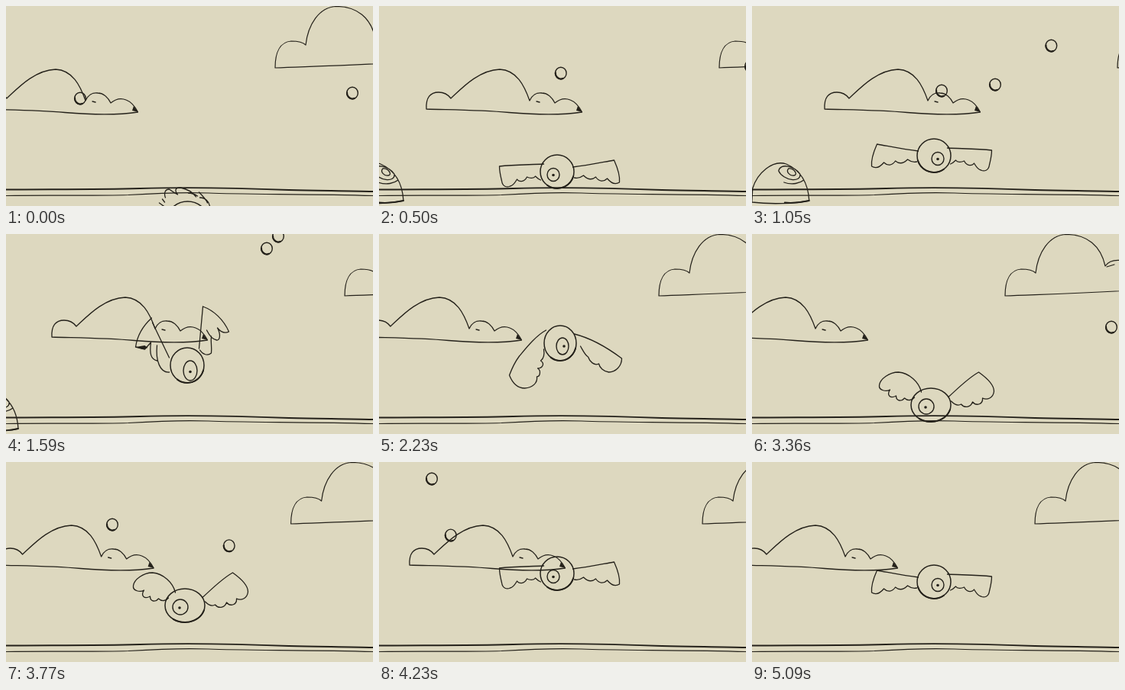
Animation, 480 px wide and 262 px high, one loop 5.13 s. Source, as an HTML page with a canvas:

```html
<!DOCTYPE html>
<html lang="en">
<head>
<meta charset="utf-8">
<title>Winged eye</title>
<style>
html, body { margin: 0; width: 100%; height: 100%; overflow: hidden; background: #ddd8bf; }
canvas { display: block; width: 480px; height: 262px; }
</style>
</head>
<body>
<canvas id="stage" width="480" height="262"></canvas>
<script>
const ctx = document.getElementById('stage').getContext('2d');
const LOOP = 5130, FPS = 22, LAST = 112;
const PAPER = '#ddd8bf', INK = '#24211a';

// [step, value] knots, joined by a smooth curve
const CLOUD_X = [[0, 352], [11, 445], [23, 478], [35, 443], [49, 366], [61, 314],
  [74, 331], [93, 423], [100, 438], [112, 370]];
const BIRD_Y = [[0, 280], [4, 240], [11, 217], [23, 196], [35, 172], [42, 148], [49, 143],
  [57, 222], [64, 236], [74, 224], [83, 188], [93, 146], [101, 226], [107, 176], [112, 157]];
const ROCK_X = [[7, -12], [11, 32], [22, 76], [35, 16], [39, -12]];

// [step, x, y, dx, dy, first step, last step]
const BALLS = [
  [0, 97, 121, 12.8, -3, 0, 31],
  [0, 453, 114, 9, 1, 0, 5],
  [11, 486, 79, -14, 2, 10, 29],
  [35, 341, 19, 9, -9, 24, 38],
  [35, 356, 3, 9, -9, 22, 37],
  [74, 470, 122, -19.8, -1.37, 73, 99],
  [93, 69, 22, -7, -6, 81, 98]
];

// wing pose for every two steps
const FLAPS = 'hhuudfufdfufdfufssdfufdddfufdfufdfufuufdfufddffuufddfuuff';

const path = d => new Path2D(d);

const LEFT_CLOUD = path('M62 135C61 120 67 113 78 113C86 113 91 117 94 121' +
  'C108 108 130 84 158 83C180 84 190 104 197 124C200 117 206 113 213 114' +
  'C221 114 227 121 230 127C236 122 243 120 250 123C258 126 262 132 265.5 139' +
  'C240 143 200 142 170 139.5C130 136 90 136 62 135M206 125L210 126');
const CLOUD_TIP = path('M260 131L266 139L258 137Z');
const RIGHT_CLOUD = path('M331 81C331 60 338 47 352 46C361 46 368 48 371 51' +
  'C374 25 388 1 412 .5C438 1 456 15 462 42C466 36 474 33 486 35' +
  'C500 38 508 52 510 72M331 81C380 79 430 78 510 73M464 43L474 40');
const GROUND_TOP = path('M0 240.5C60 240 120 240.5 175 239C240 237 320 239 370 241C410 242 450 242 480 243');
const GROUND_LOW = path('M0 248.5C60 247.5 110 249 160 247.5C200 245 230 243.5 265 245C310 247 400 246 480 248.5');
const ROCK = path('M0 16C-1 0 -7 -22 -30 -32C-48 -38 -68 -20 -74 0L-75 18C-50 21 -18 20 0 16' +
  'M-33 -8C-22 -4 -12 -7 -7 -11M-40 -23C-38 -34 -19 -29 -12 -19C-10 -7 -34 -10 -40 -23' +
  'M-27 -26C-20 -27 -14 -18 -20 -17C-25 -16 -31 -22 -27 -26');
const ROCK_SHADE = path('M-32 18.5C-20 19.5 -9 18 0 16');

// wings and ellipses sit around the centre; look is the side the pose is drawn for
const POSES = {
  f: {
    look: -1, body: [-2.5, 0, 22, 22], iris: [-7.5, 4, 8, 8.5], pupil: [-7.5, 4.5],
    wings: path('M-20 -10C-40 -9 -60 -9 -78 -7C-78 0 -76 8 -75 12C-74 20 -68 21 -64 19' +
      'C-59 18 -57 13 -55 10C-53 13 -46 15 -42 7C-38 9 -33 9 -31 6C-29 8 -27 10 -24 11' +
      'M18 -6C36 -8 55 -12 72 -15C76 -6 80 5 79 14C74 17 68 15 63 9' +
      'C58 14 52 13 48 7C42 12 36 9 32 5C28 8 24 9 20 8')
  },
  u: {
    look: -1, body: [-1.5, 0, 26, 22], iris: [-7.5, 2, 10, 10], pupil: [-8.5, 3],
    wings: path('M-14 -17C-17 -30 -30 -42 -44 -43C-56 -43 -68 -34 -69 -26C-70 -19 -60 -17 -55 -20' +
      'C-60 -12 -54 -8 -47 -12C-47 -5 -40 -4 -36 -9C-32 -5 -26 -6 -23 -10' +
      'M22 -11C34 -22 48 -36 61 -43C68 -38 81 -28 81 -18C80 -9 72 -6 66 -9' +
      'C67 -1 58 2 53 -4C50 4 42 4 38 -1C33 2 28 -2 25 -5')
  },
  d: {
    look: 1, body: [1.5, 0, 21, 23], iris: [4.5, 4, 8, 11], pupil: [6.5, 4],
    wings: path('M-17 -17C-30 -10 -42 5 -52 17C-58 25 -62 34 -65 42C-61 52 -55 59 -45 59' +
      'C-34 58 -28 52 -29 44C-25 44 -23 36 -28 33C-22 33 -18 27 -24 23C-20 20 -19 14 -20 8' +
      'M20 -12C40 -7 62 5 82 20C82 30 74 38 65 38C58 37 53 32 52 27' +
      'C46 30 40 24 38 18C34 16 31 9 28 4')
  },
  s: {
    look: 1, body: [1.5, 0, 22, 23], iris: [5.5, 7, 9, 13], pupil: [5.5, 8.5],
    wings: path('M-45 -62C-56 -52 -64 -38 -66 -24L-54 -21L-46 -30M-46 -30C-48 -15 -46 -8 -38 -6' +
      'M-38 -26C-40 -6 -34 10 -22 9M-44 -56L-22 -10' +
      'M22 -77C36 -72 49 -60 56 -44C50 -41 45 -44 41 -49C46 -40 44 -32 40 -33C34 -34 30 -40 27 -46' +
      'M22 -77L17 -22M33 -38C32 -30 34 -24 33 -16C28 -12 22 -14 18 -20'),
    shade: path('M-66 -24L-54 -26L-50 -23L-57 -21Z')
  },
  h: {
    look: -1, body: [2, 1, 27, 25], iris: [-5, 6, 9, 9], pupil: [-6, 6],
    wings: path('M-27 -29C-29 -34 -28 -40 -22 -40C-18 -37 -15 -35 -11 -33C-16 -39 -13 -43 -7 -42' +
      'C2 -40 9 -36 13 -30M3 -35C8 -35 12 -33 15 -31M17 -36C22 -31 26 -27 28 -22' +
      'M18 -29C25 -29 30 -24 31 -18M-35 -22L-28 -17M-31 -27L-28 -23')
  }
};

function curve(knots, n) {
  let i = 0;
  while (i < knots.length - 2 && n >= knots[i + 1][0]) i++;
  const [a, p] = knots[i], [b, q] = knots[i + 1];
  const slope = k => {
    const l = knots[Math.max(k - 1, 0)], r = knots[Math.min(k + 1, knots.length - 1)];
    return (r[1] - l[1]) / (r[0] - l[0]);
  };
  const w = b - a, u = (n - a) / w, v = 1 - u;
  return v * v * (1 + 2 * u) * p + u * u * (3 - 2 * u) * q +
    u * v * w * (v * slope(i) - u * slope(i + 1));
}

function ink(shape, width = 1.3) {
  ctx.lineWidth = width;
  ctx.stroke(shape);
}

function oval(x, y, rx, ry, width, from = 0, to = 7) {
  ctx.beginPath();
  ctx.ellipse(x, y, rx, ry, 0, from, Math.min(to, from + Math.PI * 2));
  ctx.lineWidth = width;
  ctx.stroke();
}

function at(x, y, draw, flip = 1) {
  ctx.save();
  ctx.translate(x, y);
  ctx.scale(flip, 1);
  draw();
  ctx.restore();
}

function drawClouds(x) {
  at(x - 445, 0, () => {
    ink(LEFT_CLOUD);
    ctx.fill(CLOUD_TIP);
  });
  at(x - 331, 0, () => ink(RIGHT_CLOUD, 1.2));
}

function drawGround() {
  ink(GROUND_TOP, 1.9);
  ink(GROUND_LOW, 1.2);
}

function drawBall(x, y) {
  oval(x, y, 7.3, 7.8, 1.4);
  oval(x, y, 7, 7.5, 2.2, 1.2, 3.2);
}

function drawBird(n) {
  const pose = POSES[FLAPS[n >> 1]];
  const look = n < 23 || (n >= 61 && n < 100) ? -1 : 1;
  at(235.5, curve(BIRD_Y, n), () => {
    ink(pose.wings);
    if (pose.shade) ctx.fill(pose.shade);
    oval(...pose.body, 1.5);
    oval(...pose.body, 2, .3, 2.2);
    oval(...pose.iris, 1.4);
    ctx.beginPath();
    ctx.arc(...pose.pupil, 1.8, 0, 7);
    ctx.fill();
  }, look * pose.look);
}

function draw(n) {
  ctx.fillStyle = PAPER;
  ctx.fillRect(0, 0, 480, 262);
  ctx.fillStyle = ctx.strokeStyle = INK;
  ctx.lineCap = ctx.lineJoin = 'round';
  drawClouds(curve(CLOUD_X, n));
  drawGround();
  if (n >= 7 && n <= 39) {
    at(curve(ROCK_X, n), 239, () => {
      ink(ROCK);
      ink(ROCK_SHADE, 1.8);
    });
  }
  for (const [k, x, y, dx, dy, from, to] of BALLS) {
    if (n >= from && n <= to) drawBall(x + dx * (n - k), y + dy * (n - k));
  }
  drawBird(n);
}

const start = performance.now();
function tick(now) {
  const t = Math.max(0, now - start) % LOOP;
  draw(Math.min(LAST, Math.floor((t + 5) * FPS / 1000)));
  requestAnimationFrame(tick);
}
draw(0);
requestAnimationFrame(tick);
</script>
</body>
</html>
```
